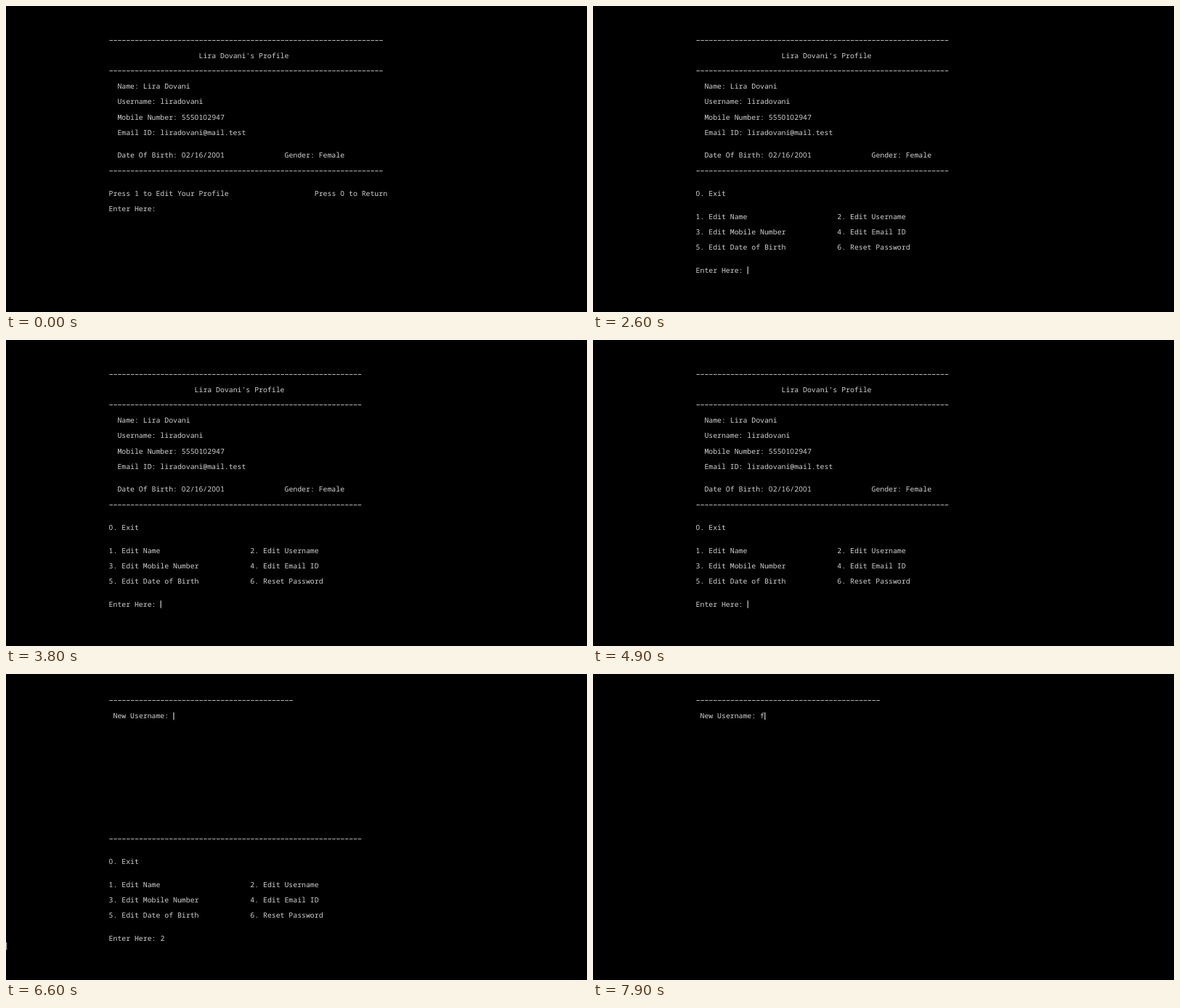
Animation of 800 by 422 pixels, one loop 8000 ms. Source, as an HTML page:

```html
<!DOCTYPE html>
<html lang="en">
<head>
<meta charset="utf-8">
<title>Profile console</title>
<style>
  html, body { margin: 0; width: 100%; height: 100%; overflow: hidden; background: #000; }
  svg { display: block; width: 100%; height: 100%; }
  text {
    font: 9.8333px "Noto Sans Mono", "DejaVu Sans Mono", monospace;
    fill: #d0d0d0;
    white-space: pre;
    text-rendering: geometricPrecision;
  }
  /* open zero, padded to one cell */
  .zero { font-family: "Noto Sans", sans-serif; letter-spacing: .28px; }
  path { stroke: #b4b4b4; stroke-width: 1; stroke-dasharray: 4.6 1.3; fill: none; }
</style>
</head>
<body>
<svg viewBox="0 0 800 422">
  <rect width="800" height="422"/>
  <g id="profile"></g>
  <g id="head"></g>
  <g id="menu"></g>
  <g id="rename"></g>
  <text id="typed"></text>
  <rect id="cursor" width="1.2" height="10.4" fill="#ccc"/>
  <rect id="stray" x="0" y="370" width="1.3" height="10.4" fill="#999"/>
</svg>
<script>
const CELL = 5.9, LINE = 10.565, LEFT = 24, LOOP = 8000;
const el = id => document.getElementById(id);

const zeros = s => s.replace(/0/g, '<tspan class="zero">0</tspan>');
const baseline = row => row * LINE + 8.6;
const put = (row, col, s) =>
  `<text x="${col * CELL}" y="${baseline(row)}">${zeros(s)}</text>`;
const rule = (row, n) =>
  `<path d="M${LEFT * CELL + .8} ${Math.floor(row * LINE + 5.3) + .5}h${n * CELL - 1.3}"/>`;

const details = (width, titleCol) =>
  rule(4, width) +
  put(6, titleCol, "Lira Dovani's Profile") +
  rule(8, width) +
  put(10, 26, 'Name: Lira Dovani') +
  put(12, 26, 'Username: liradovani') +
  put(14, 26, 'Mobile Number: 5550102947') +
  put(16, 26, 'Email ID: liradovani@mail.test') +
  put(19, 26, 'Date Of Birth: 02/16/2001') +
  put(19, 65, 'Gender: Female');

el('profile').innerHTML = details(64, 45) +
  rule(21, 64) +
  put(24, LEFT, 'Press 1 to Edit Your Profile') +
  put(24, 72, 'Press 0 to Return') +
  put(26, LEFT, 'Enter Here:');

el('head').innerHTML = details(59, 44);

const options = ['Name', 'Username', 'Mobile Number', 'Email ID', 'Date of Birth'];
el('menu').innerHTML = rule(21, 59) +
  put(24, LEFT, '0. Exit') +
  options.map((o, i) =>
    put(27 + 2 * (i >> 1), i % 2 ? 57 : LEFT, `${i + 1}. Edit ${o}`)).join('') +
  put(31, 57, '6. Reset Password') +
  put(34, LEFT, 'Enter Here:');

el('rename').innerHTML = rule(3, 43) + put(5, 25, 'New Username:');

// each prompt: start, cursor cell, key pressed and when
const prompts = [
  { at: 0, row: 26, col: 36, key: '1', press: 1500 },
  { at: 2600, row: 34, col: 36, key: '2', press: 5400 },
  { at: 6600, row: 5, col: 39, key: 'f', press: 7900 }
];
// cursor starts hidden and flips at these times
const flips = [200, 800, 1300, 2000, 2500, 3200, 3700, 4300, 4800, 5900, 6500, 7200, 7700];
const CLEARED = 6700;

const show = (id, on) => el(id).setAttribute('display', on ? 'inline' : 'none');
const move = (id, x, y) => {
  el(id).setAttribute('x', x);
  el(id).setAttribute('y', y);
};

function draw(t) {
  const step = prompts.filter(p => t >= p.at).length - 1;
  const p = prompts[step];
  const pressed = t >= p.press;
  const wiping = step === 2 && t < CLEARED;

  show('profile', step === 0);
  show('head', step === 1);
  show('menu', step === 1 || wiping);
  show('rename', step === 2);
  show('stray', wiping);

  // the last choice stays on screen until the wipe is done
  const echo = wiping ? prompts[1] : p;
  el('typed').textContent = pressed || wiping ? echo.key : '';
  move('typed', echo.col * CELL, baseline(echo.row));

  show('cursor', flips.filter(f => t >= f).length % 2);
  move('cursor', (p.col + pressed) * CELL + .2, p.row * LINE + .1);
}

const start = performance.now();
function tick() {
  draw((performance.now() - start) % LOOP);
  requestAnimationFrame(tick);
}
draw(0);
requestAnimationFrame(tick);
</script>
</body>
</html>
```
